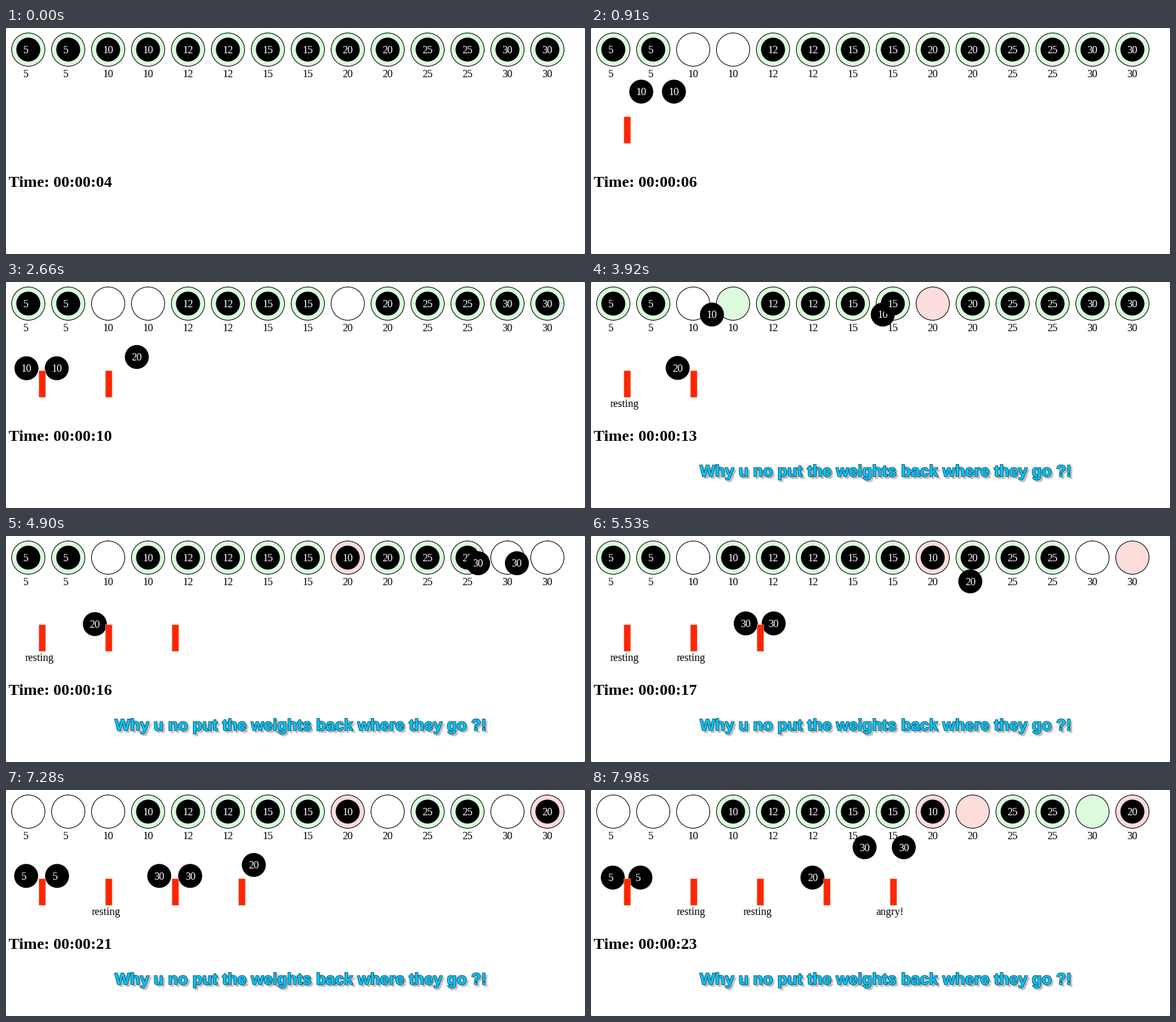
A matplotlib script that plays this animation: 870 by 340 pixels, repeating every 8 s.

```python
import matplotlib.pyplot as plt
import matplotlib.patheffects as pe
import numpy as np
from matplotlib.animation import FuncAnimation
from matplotlib.patches import Circle, Rectangle

W, H, DPI = 870, 340, 80
LOOP, INTERVAL, STEP = 8000, 40, 70
PX = 72 / DPI

SECOND = 420                 # one gym second in ms
FLIGHT, LEAD = 377, 32       # travel time of a weight, head start before the tick
GREEN, PINK, RED, CYAN = "#dcfadc", "#fddcdc", "#ff2600", "#00c8fa"
SIZES = [s for s in (5, 10, 12, 15, 20, 25, 30) for _ in range(2)]

LEFT, RIGHT = -1, 1
# weight index -> trips (second, kind, place, side)
TRIPS = {
    0: [(20, "hand", 0, LEFT)],
    1: [(20, "hand", 0, RIGHT)],
    2: [(6, "hand", 0, LEFT), (13, "slot", 3, 0)],
    3: [(6, "hand", 0, RIGHT), (13, "slot", 8, 0)],
    8: [(10, "hand", 1, LEFT), (17, "slot", 13, 0)],
    9: [(21, "hand", 3, LEFT)],
    12: [(16, "hand", 2, LEFT), (23, "slot", 12, 0)],
    13: [(16, "hand", 2, RIGHT), (23, "slot", 9, 0)],
}
ARRIVALS = [6, 10, 16, 21, 22]
# lifter -> (text, first second, last second)
MOODS = {0: ("resting", 13, 20), 1: ("resting", 17, 99),
         2: ("resting", 23, 99), 4: ("angry!", 22, 99)}
BANNER_SECOND = 13


def tick_time(second):
    return 280 + SECOND * (second - 5)


def clock(t):
    return 5 + (t - 280) // SECOND


def lift(t):
    """Height of the lifting stroke: down, pause, up, pause."""
    return np.interp((t - 70) % 3360, [0, 1400, 1820, 3220, 3360], [5, 0, 0, 5, 5])


def spot(kind, place, side, t):
    if kind == "slot":
        return np.array([33.5 + 60 * place, 32.5])
    rise = lift(t)
    return np.array([53.5 + 100 * place + side * (20 + rise), 132.5 - rise])


def weight_state(i, t):
    """Position of a weight and the slot it holds, if any."""
    here = ("slot", i, 0)
    for second, *there in TRIPS.get(i, []):
        if t < tick_time(second):
            break
        start = tick_time(second) - LEAD
        part = (t - start) / FLIGHT
        if part < 1:
            a, b = spot(*here, start), spot(*there, start + FLIGHT)
            return a + (b - a) * part, there[1] if there[0] == "slot" else None
        here = there
    return spot(*here, t), here[1] if here[0] == "slot" else None


plt.rcParams["font.family"] = "Liberation Serif"
fig = plt.figure(figsize=(W / DPI, H / DPI), dpi=DPI, facecolor="white")
ax = fig.add_axes([0, 0, 1, 1])
ax.set(xlim=(0, W), ylim=(H, 0))
ax.axis("off")


def write(x, y, text, size=16, **style):
    return ax.text(x, y, text, fontsize=size * PX, ha="left", va="baseline", **style)


slots, discs, numbers = [], [], []
for i, size in enumerate(SIZES):
    x, y = spot("slot", i, 0, 0)
    slots.append(ax.add_patch(Circle((x, y), 25, ec="black", lw=PX, zorder=1)))
    discs.append(ax.add_patch(Circle((x, y), 18, fc="black", ec="none", zorder=3 + i / 50)))
    numbers.append(write(x - 8, y + 5.5, str(size), color="white", zorder=3.01 + i / 50))
    write(x - 8, 73.5, str(size), zorder=2)

bars = [ax.add_patch(Rectangle((48.5 + 100 * k, 132.5), 10, 40, fc=RED,
                               ec="#d9a59c", lw=0.6 * PX, zorder=5))
        for k in range(len(ARRIVALS))]
moods = {k: write(28.5 + 100 * k, 188.5, mood[0], zorder=2) for k, mood in MOODS.items()}
timer = write(4.5, 239, "", 24, weight="bold")

SHOUT = "Why u no put the weights back where they go ?!"
shout_style = dict(size=24.4, family="Liberation Sans", weight="bold")
banner = [
    write(166.5, 295.5, SHOUT, color="#c2c2c2", zorder=6,
          path_effects=[pe.withStroke(linewidth=1.4 * PX, foreground="#c2c2c2")],
          **shout_style),
    write(163.5, 292.5, SHOUT, color=CYAN, zorder=7,
          path_effects=[pe.withStroke(linewidth=1.8 * PX, foreground="#174f68")],
          **shout_style),
]

# window corners
for cx in (0, W - 1):
    for cy in (0, H - 1):
        ax.add_patch(Rectangle((cx, cy), 1, 1, fc="#a0a0a0", ec="none"))


def update(frame):
    t = (frame * INTERVAL + 30) // STEP * STEP
    now = clock(t)
    fills = ["white"] * len(SIZES)
    for i, size in enumerate(SIZES):
        (x, y), slot = weight_state(i, t)
        discs[i].center = x, y
        numbers[i].set_position((x - 8, y + 5.5))
        if slot is not None:
            fills[slot] = GREEN if SIZES[slot] == size else PINK
    for circle, fill in zip(slots, fills):
        circle.set_facecolor(fill)
    for bar, arrival in zip(bars, ARRIVALS):
        bar.set_visible(now >= arrival)
    for k, (_, first, last) in MOODS.items():
        moods[k].set_visible(first <= now < last)
    for layer in banner:
        layer.set_visible(now >= BANNER_SECOND)
    timer.set_text(f"Time: 00:00:{now:02d}")
    return []


anim = FuncAnimation(fig, update, frames=LOOP // INTERVAL, interval=INTERVAL,
                     init_func=lambda: update(0), repeat=True, repeat_delay=0)
plt.show()
```
